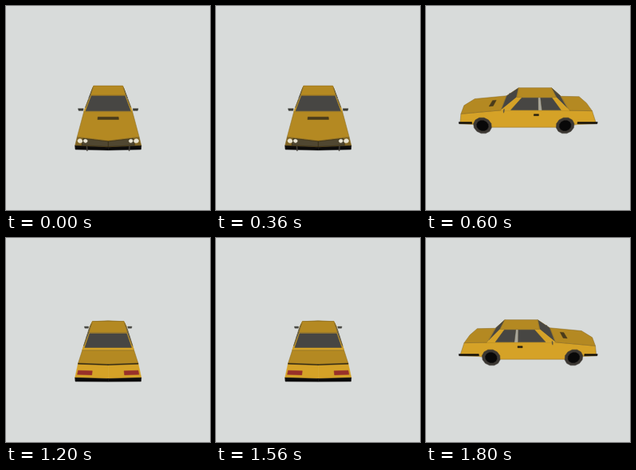
Write an HTML page that moves like this. It is 256 px wide and 256 px high and loops after 2400 ms.

```html
<!DOCTYPE html>
<html>
<head>
<meta charset="utf-8">
<title>Turning car</title>
<style>
  html, body { margin: 0; width: 100%; height: 100%; overflow: hidden; background: #d8dbda; }
  svg { display: block; width: 100vw; height: 100vh; }
</style>
</head>
<body>
<svg id="stage" viewBox="0 0 256 256"></svg>
<script>
const HOLD = 600, STEPS = 4;
const FOCAL = 211, DIST = 219, SIN = 0.37, COS = 0.929;
const TOP = '#b48922', SIDE = '#d5a227', GLASS = '#474643', BLACK = '#0c0b0a', SEAM = '#86671c';

// Points are [across, up, forward]; faces run clockwise seen from outside.
const parts = [];
const flip = ([x, y, f]) => [-x, y, f];
const add = (pts, fill, edge = fill) => parts.push({ pts, fill, edge });
const pair = (pts, fill, edge) => {
  add(pts, fill, edge);
  add(pts.map(flip).reverse(), fill, edge);
};

const mix = (a, b, t) => a.map((v, i) => v + (b[i] - v) * t);
// part of a four-cornered panel, u along its top, v down its side
const inset = ([tl, tr, br, bl], u0, u1, v0, v1) =>
  [[u0, v0], [u1, v0], [u1, v1], [u0, v1]].map(([u, v]) => mix(mix(tl, tr, u), mix(bl, br, u), v));
const disc = (n, at) => Array.from({ length: n }, (_, i) => {
  const a = (i + 0.5) / n * 2 * Math.PI;
  return at(Math.cos(a), Math.sin(a));
});

// key points of the right half
const roofF = [20.9, 21.5, 13], roofR = [20.9, 21.5, -32];
const beltF = [27, 8, 31], beltR = [26.5, 7.5, -47];
const nose = [27, 3.5, 77], noseMid = [0, 3.5, 83];
const tail = [26.5, 7, -73], tailMid = [0, 7, -75];
const bumpF = [29, -4, 79], bumpFMid = [0, -4, 81.5];
const bumpR = [29, -4, -79], bumpRMid = [0, -4, -80.5];
const lower = ([x, y, f], d) => [x, y - d, f];

function buildBody() {
  pair([nose, beltF, beltR, tail, lower(bumpR, 4), [29, -9, -57], [28.5, -13, -38],
    [28.5, -13, 44], [29, -9, 64], lower(bumpF, 4)], SIDE, SEAM);
  add([flip(beltF), beltF, nose, noseMid, flip(nose)], TOP, SEAM);
  add([flip(tail), tailMid, tail, beltR, flip(beltR)], TOP, SEAM);
  add(inset([[-10.8, 7, 43], [10.8, 7, 43], [10.8, 6.5, 48], [-10.8, 6.5, 48]], 0, 1, 0, 1), '#493b1b');
}

function buildEnds() {
  const front = [noseMid, nose, bumpF, bumpFMid];
  const rear = [tail, tailMid, bumpRMid, bumpR];
  pair(front, '#806423', SEAM);
  pair(inset(front, 0, 0.8, 0.08, 0.9), '#504731', '#28220f');
  for (const [x, r] of [[24.3, 2.1], [19.6, 1.7]])
    pair(disc(12, (c, s) => [x + r * c, 0.8 - r * s, 79]), '#e9e4d2');
  pair(rear, SIDE);
  pair(inset(rear, 0, 1, 0, 0.06), '#332a14');
  pair(inset(rear, 0.05, 0.5, 0.5, 0.78), '#98302a');
  pair([bumpFMid, bumpF, lower(bumpF, 4), lower(bumpFMid, 3)], BLACK);
  pair([bumpR, bumpRMid, lower(bumpRMid, 3), lower(bumpR, 4)], BLACK);
  pair(inset([[18, -3, 81], [18.7, -3, 81], [18.7, -8, 81], [18, -8, 81]], 0, 1, 0, 1), '#45413a');
}

function buildCabin() {
  const side = [roofF, roofR, beltR, beltF];
  const screen = [flip(roofF), roofF, beltF, flip(beltF)];
  const back = [roofR, flip(roofR), flip(beltR), beltR];
  add(screen, SIDE, SEAM);
  add(inset(screen, 0.03, 0.97, 0.04, 0.96), GLASS);
  add(back, SIDE, SEAM);
  add(inset(back, 0.03, 0.97, 0.06, 0.86), GLASS);
  pair(side, SIDE);
  for (const [u0, u1, fill] of [[0.14, 0.55, GLASS], [0.55, 0.6, '#a8a69b'], [0.6, 0.88, GLASS]])
    pair(inset(side, u0, u1, 0.05, 0.97), fill);
  add([flip(roofR), roofR, roofF, flip(roofF)], TOP, SEAM);
}

function buildTrim() {
  const plate = (x, f0, f1, y1, y0) => [[x, y1, f0], [x, y1, f1], [x, y0, f1], [x, y0, f0]];
  pair(plate(28, -6.5, -12, 3.6, 1.6), '#251f10');
  pair(plate(29.3, 80, 65, -5.8, -8), BLACK);
  pair(plate(29.3, -57, -80, -5.8, -8), BLACK);
  for (const f of [53, -43])
    for (const [r, fill] of [[10.6, '#3b3732'], [6.8, '#080808']])
      pair(disc(12, (c, s) => [29.5, -10.4 - r * s, f - r * c]), fill);
  const mirror = [[28, 10, 27], [34, 10, 27], [33.5, 7.5, 27], [28.5, 7.5, 27]];
  pair(mirror, '#3c3d38');
  pair([...mirror].reverse(), '#4a4b46');
}

function project([x, y, f], yaw) {
  const c = Math.cos(yaw), s = Math.sin(yaw);
  const across = x * c - f * s, near = x * s + f * c;
  const scale = FOCAL / (DIST - COS * near - SIN * y);
  return [128.2 + scale * across, 128 - scale * (COS * y - SIN * near)];
}

const facing = pts => pts.reduce((sum, [x, y], i) => {
  const [nx, ny] = pts[(i + 1) % pts.length];
  return sum + x * ny - nx * y;
}, 0) > 0;

buildBody();
buildEnds();
buildCabin();
buildTrim();

const stage = document.getElementById('stage');
stage.innerHTML = '<rect width="256" height="256" fill="#d8dbda"/>' + parts.map(p =>
  `<polygon fill="${p.fill}" stroke="${p.edge}" stroke-width="0.5" stroke-linejoin="round"/>`).join('');
const shapes = stage.querySelectorAll('polygon');

function draw(ms) {
  const yaw = Math.floor(ms / HOLD) % STEPS * 2 * Math.PI / STEPS;
  parts.forEach((part, i) => {
    const pts = part.pts.map(p => project(p, yaw));
    shapes[i].setAttribute('points', pts.map(p => p.map(v => v.toFixed(2))).join(' '));
    shapes[i].setAttribute('visibility', facing(pts) ? 'visible' : 'hidden');
  });
}

const start = performance.now();
function tick() {
  draw(performance.now() - start);
  requestAnimationFrame(tick);
}
tick();
</script>
</body>
</html>
```
